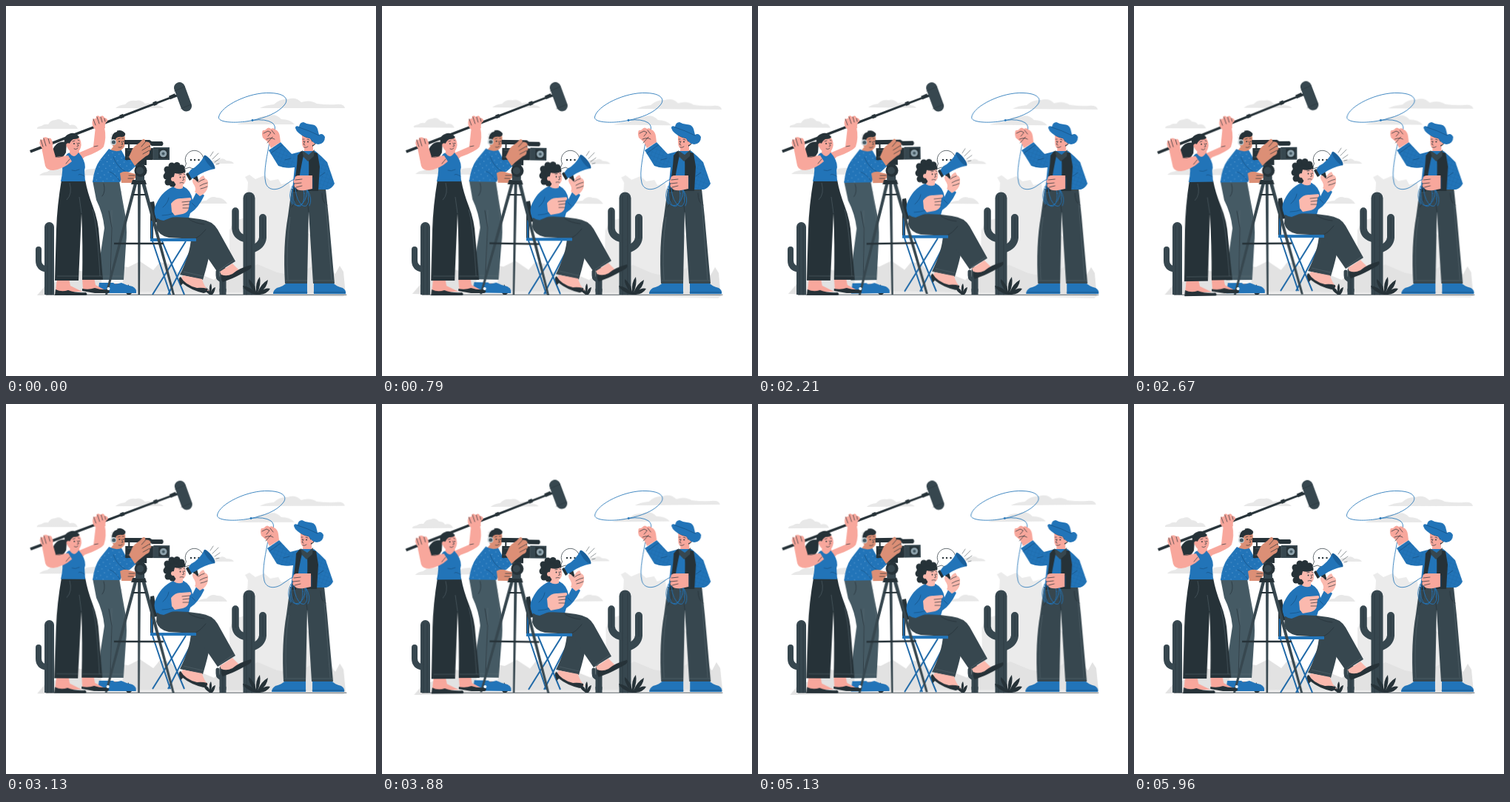
An HTML page that plays this animation: 500 px wide and 500 px high, repeating every 6 s.

```html
<!DOCTYPE html>
<html lang="en">
<head>
<meta charset="utf-8">
<title>Western film shoot</title>
<style>
html, body { margin: 0; width: 100%; height: 100%; overflow: hidden; background: #fff; }
svg { display: block; width: 100%; height: 100%; }
.blue { fill: #2274b8; }
.navy { fill: #195f9b; }
.ink { fill: #263238; }
.slate { fill: #37474f; }
.steel { fill: #455a64; }
.skin { fill: #f8a79c; }
#camera .skin { fill: #dc8f76; }
#director .skin { fill: #fbb9ae; }
.sky { fill: #e8e8e8; }
.hill { fill: #e2e2e2; }
.mesa { fill: #ebebeb; }
.line { fill: none; stroke: #263238; stroke-width: .7; stroke-linecap: round; stroke-linejoin: round; }
.hair-line { fill: none; stroke: #263238; stroke-width: .5; stroke-linecap: round; }
.seam { fill: none; stroke: #5d6d75; stroke-width: .5; }
.fold { fill: none; stroke: #174f80; stroke-width: .7; stroke-linecap: round; }
.rope { fill: none; stroke: #2274b8; stroke-width: .85; stroke-linecap: round; }
.frame { fill: none; stroke: #1f69a8; stroke-width: 2; }

/* Rotating groups pivot on their own centre */
.wind { animation: wind 6s linear infinite; }
#scenery { transform-origin: 250px 258px; }
#camera { transform-origin: 171px 280px; animation-duration: 3s; }
#boom { transform-origin: 142px 247px; animation-duration: 1.5s; }
#director { animation: float 6s ease-in-out infinite; }
#cowboy { animation: shake 6s linear infinite; }

@keyframes wind {
  25% { transform: rotate(1deg); }
  75% { transform: rotate(-1deg); }
}
@keyframes float {
  50% { transform: translateY(-5px); }
}
@keyframes shake {
  10%, 90% { transform: translateX(-1px); }
  20%, 80% { transform: translateX(2px); }
  30%, 50%, 70% { transform: translateX(-3.5px); }
  40%, 60% { transform: translateX(3.5px); }
}
</style>
</head>
<body>
<svg viewBox="0 0 500 500" xmlns="http://www.w3.org/2000/svg">
<defs>
  <pattern id="dots" width="9" height="9" patternUnits="userSpaceOnUse" patternTransform="rotate(12)">
    <g fill="#7fb3de"><circle cx="2" cy="2" r=".6"/><circle cx="6.5" cy="6.5" r=".6"/></g>
  </pattern>
  <pattern id="check" width="5" height="5" patternUnits="userSpaceOnUse" patternTransform="rotate(20)">
    <path d="M0 0H5M0 0V5" fill="none" stroke="#1d659f" stroke-width=".5"/>
  </pattern>
</defs>

<g id="scenery" class="wind">
  <g class="sky">
    <path d="M42 166Q41 163 48 162Q52 159 57 160Q60 154 67 154Q73 151 78 157Q84 157 86 161Q94 159 97 166Z"/>
    <path d="M148 138Q152 134 161 133Q166 127 175 128Q183 126 188 132Q196 130 200 134Q210 134 213 138Z"/>
    <path d="M45 229Q48 225 56 224Q62 219 70 220Q84 216 92 224L111 229Z"/>
    <path d="M343 138Q350 134 362 133Q370 125 381 126Q391 122 399 130Q411 126 420 132Q435 134 446 133Q457 132 458 138Z"/>
    <path d="M312 160Q322 156 335 155Q342 148 352 149Q364 144 372 153Q384 153 390 160Z"/>
    <path d="M272 213Q279 207 288 208Q293 204 298 209Q306 209 308 213Z"/>
    <path d="M258 267Q264 263 271 263Q277 256 285 259Q293 258 299 267Z"/>
    <path d="M96 229Q105 219 120 220L136 229Z"/>
  </g>
  <path class="mesa" d="M302 390V303L308 290L324 286L327 238L323 231L329 228L337 234L349 229L357 236L368 234L372 241L383 238L386 270L400 300L424 320L444 362V390Z"/>
  <path class="hill" d="M42 391L53 378L70 372L96 357L121 362L146 350L165 353L181 345L199 357L208 346L222 349L232 360L259 361L281 370L302 352L322 357L340 349L366 360L391 365L420 348L434 353L445 362L451 351L456 359L459 391Z"/>
  <path class="mesa" d="M44 390Q170 384 290 387Q400 386 458 390L456 393L330 391Z"/>
</g>

<path class="line" d="M54 390.300H460"/>

<g id="plants">
  <g fill="none" stroke="#37474f" stroke-linecap="round">
    <path stroke-width="13" d="M58.500 298.500V383"/>
    <path stroke-width="8" d="M44 329V344Q44 354 55 356"/>
    <path stroke-width="16" d="M328.500 259.500V381"/>
    <path stroke-width="9.500" d="M310 277V301Q311 312 325 315"/>
    <path stroke-width="10" d="M347 286V313Q346 324 332 329"/>
    <path stroke-width="9" d="M293 357V385"/>
    <path stroke-width="5" d="M286 359V364Q286 370 292 371"/>
  </g>
  <path class="slate" d="M52 380H65V390H52ZM320.500 378H336.500V390H320.500ZM288.500 382H297.500V390H288.500Z"/>
  <path class="hair-line" d="M56 296V390M61 296V390M325 256V390M332 256V390M310 276V302M347 286V314M293 357V389"/>
  <g class="ink">
    <path d="M337 390Q323 386 320 378Q331 380 336 387Q327 376 328 369Q336 375 338 386Q337 373 343 366Q345 376 340 387Q345 375 354 370Q353 381 343 387Q351 380 357 382Q353 389 343 390Z"/>
    <path d="M275 390Q267 385 267 379Q274 382 275 386Q274 378 277 375Q279 381 277 386Q279 381 283 380Q282 387 279 390Z"/>
    <path d="M164 390L156 381Q163 382 164 386L165 376Q169 382 166 387L173 381Q172 387 168 390Z"/>
  </g>
</g>

<g id="bubble">
  <path d="M248 218L240.500 220.500L243.500 213A12.300 12.300 0 1 1 248 218Z" fill="#fff" stroke="#263238" stroke-width=".7"/>
  <g class="ink"><circle cx="250" cy="208" r="1.200"/><circle cx="255" cy="208" r="1.200"/><circle cx="260.500" cy="208" r="1.200"/></g>
</g>

<g id="director">
  <path class="frame" d="M198 318L222 390M243 318L198 390M211 318L241 390M256 318L219 390"/>
  <path class="ink" d="M195 265L200 264L205 292L199 293L199 314H195Z"/>
  <path class="frame" d="M197 290V315"/>
  <path class="slate" d="M237 302H270Q279 313 276 330Q273 347 266 370L235 363Q249 335 250 314Z"/>
  <path class="skin" d="M239 364L265 369Q267 378 274 385Q252 383 235 371Z"/>
  <path class="ink" d="M236 366Q233 367 234 371L236 378L239 375Q250 384 267 388Q273 387 272 382Q265 380 258 381Q242 377 236 366Z"/>
  <path class="blue" d="M226 244L240 244Q250 249 252 262L259 248L268 256Q260 273 249 280L246 290L205 291Q199 281 201 272Q209 251 226 244Z"/>
  <path class="slate" d="M204 287Q235 283 262 288Q279 290 286 302L310 345L286 360L255 315L220 313Q206 310 203 299Z"/>
  <path class="seam" d="M288 357L308 343M240 359L266 365"/>
  <path class="line" d="M255 315Q263 311 270 302M247 288Q256 294 268 295"/>
  <path class="skin" d="M289 359L306 348L315 357L294 370Z"/>
  <path class="ink" d="M291 363Q298 366 306 362Q315 354 331 350Q333 353 329 356Q315 364 306 368L293 373Q290 370 291 363Z"/>
  <path class="blue" d="M195 314H257V318H195Z"/>
  <path class="skin" d="M228 237L239 240L239 246Q233 249 227 245Z"/>
  <g class="ink">
    <circle cx="226" cy="227" r="11.500"/><circle cx="218" cy="221" r="4.500"/><circle cx="224" cy="216" r="4.500"/>
    <circle cx="231" cy="215.500" r="4.500"/><circle cx="237" cy="219" r="4.500"/><circle cx="239" cy="223" r="3.500"/>
    <circle cx="217" cy="230" r="4.500"/><circle cx="219" cy="238" r="4.500"/><circle cx="225" cy="240" r="4.500"/>
  </g>
  <path class="skin" d="M228 226Q236 228 241 225Q244 230 243 236Q241 243 234 243Q227 241 226 234Z"/>
  <circle class="skin" cx="226" cy="234" r="3"/>
  <path class="line" d="M234 228L237 227.500M240 227L242 228M239 231L240.500 235L238.500 235.500M235 239Q238 238 240 239"/>
  <g class="ink"><circle cx="235.500" cy="231.500" r=".9"/><circle cx="241" cy="231" r=".8"/></g>
  <g id="megaphone">
    <path class="ink" d="M252 230L258 228L261 239L256 240Z"/>
    <path class="blue" d="M244 229L250 221Q262 215 268 202L282 220Q267 223 256 231L248 235Z"/>
    <ellipse class="navy" cx="275" cy="211" rx="3.200" ry="11.500" transform="rotate(-38 275 211)"/>
    <path class="ink" d="M243 227L246 225L251 234L248 236Z"/>
    <path class="hair-line" d="M276 203L280 197M279 207L287 199M282 211L289 206M284 214L288 213"/>
  </g>
  <path class="skin" d="M253 240Q250 233 255 234L259 238Q262 230 267 229L269 233Q274 235 273 241Q273 249 267 254L262 257L255 251Q258 247 253 240Z"/>
  <path class="line" d="M260 238Q264 235 268 234M262 243Q267 240 272 239M263 247Q268 246 272 244"/>
  <path class="blue" d="M213 255L223 266L218 272L228 280L228 284L213 290Q202 289 201 279Z"/>
  <path class="fold" d="M220 259Q219 266 212 272M246 261Q246 270 240 276M228 280Q218 283 211 283M251 266L256 271"/>
  <path class="skin" d="M223 267Q229 259 237 260L249 259Q252 261 248 264L247 273Q246 279 239 281L228 283L224 278Z"/>
  <path class="line" d="M238 265L248 264M239 269L248 268M239 273L247 273"/>
</g>

<g id="camera" class="wind">
  <path class="skin" d="M129 367H158V376H129Z"/>
  <path fill="#f5f5f5" d="M129 370H158V375H129Z"/>
  <path class="blue" d="M126 374H145L152 380V388H124ZM138 375Q148 377 156 374Q164 378 171 379Q177 382 176 388H138Z"/>
  <path class="steel" d="M117 236H153Q156 255 162 287Q164 306 162 323L159 370H124Q127 335 133 300Q131 280 122 262Z"/>
  <path class="seam" d="M143 276L142 365M125 365H159M155 250L160 290"/>
  <path class="line" d="M132 240Q135 251 130 257M141 370L143 300L139 277"/>
  <path class="skin" d="M145 190H156V199L148 201L141 195Z"/>
  <g id="shirt">
    <path class="blue" d="M139 193Q147 198 156 195L163 208L168 204L178 214L167 224L160 226L154 238H117Q119 219 127 208Z"/>
    <path fill="url(#dots)" d="M139 193Q147 198 156 195L163 208L168 204L178 214L167 224L160 226L154 238H117Q119 219 127 208Z"/>
  </g>
  <path class="fold" d="M145 204Q150 218 162 224M164 209L159 206M154 237Q147 226 140 224"/>
  <path class="skin" d="M154 226Q160 222 167 225L175 227Q178 230 174 233L170 239L156 239Z"/>
  <path class="line" d="M166 229H174M165 233H172"/>

  <path class="skin" d="M144 174Q153 176 160 174Q162 181 160 190Q157 196 150 195Q142 190 143 182Z"/>
  <path class="ink" d="M143 185Q139 173 147 170Q155 165 161 172Q162 176 157 177Q150 176 148 180L147 186Z"/>
  <path d="M142 183Q141 171 150 169" fill="none" stroke="#fff" stroke-width="1.300"/>
  <circle cx="145" cy="184" r="4" fill="#cfd8dc"/><circle class="steel" cx="145.500" cy="184" r="2.600"/>
  <path class="line" d="M151 180L154 179M157 179H159M156 183L158 187L156 187M152 191Q155 192 157 190"/>
  <g class="ink"><circle cx="153" cy="183" r=".9"/><circle cx="158.500" cy="183" r=".8"/></g>

  <g id="tripod">
    <path class="slate" d="M173 239H177.500L137 390H134ZM178 239H182L181 390H178.500ZM183 239H188L228 390H225Z"/>
    <path class="ink" d="M146 319.700H213V322.300H146ZM171 254H189V256H171Z"/>
    <path class="ink" d="M171 235H188L190 241H169ZM174 208H190V215H174Z"/>
    <path class="slate" d="M175 214H187V236H175Z"/>
    <circle class="ink" cx="182" cy="222.500" r="8.500"/><circle class="slate" cx="181" cy="222.500" r="5"/>
  </g>
  <path class="ink" d="M161 192H199L202 194V206L198 208H161ZM160 181H194L197 183H211Q214 186 211 189H197L194 187H160ZM165 185H167V193H165ZM193 187H195V193H193Z"/>
  <path class="slate" d="M199 191H221V208H199Z"/>
  <path class="ink" d="M206 193H219V206H206Z"/>
  <circle cx="212.500" cy="199.500" r="4.800" fill="#90a4ae"/><circle class="steel" cx="212.500" cy="199.500" r="2"/>
  <path class="seam" d="M164 195H194M199 192V207M163 204H175"/>
  <path class="skin" d="M166 204L171 193Q175 188 180 185L185 180Q188 179 188 183L193 184Q197 187 194 190Q198 192 194 196Q195 201 189 203L179 211L174 216Z"/>
  <path class="line" d="M183 190L189 183M184 195L194 189M185 200L194 195"/>
</g>

<g id="boom" class="wind">
  <path class="skin" d="M69 368H85L87 378L103 386H67ZM103 367H119L121 377L134 384H104Z"/>
  <path class="ink" d="M67 383Q75 387 84 384Q95 388 108 387Q111 390 108 391H66ZM103 382Q112 384 120 381Q129 384 138 383Q142 386 138 388H120L103 385Z"/>
  <circle cx="138.500" cy="382" r="2" fill="#fff"/>
  <path class="ink" d="M75 235H107Q110 252 117 270Q125 290 126 312L131 370H103Q104 320 102 280L98 371H66L68 302Q69 270 75 235Z"/>
  <path class="seam" d="M69 365H98M104 365H130M117 275Q123 295 127 365"/>
  <path class="seam" d="M86 239Q90 254 82 262M102 280L99 258"/>

  <path class="ink" d="M82 184Q73 182 68 187Q61 193 64 201Q63 206 69 208Q77 206 81 198Z"/>
  <path class="skin" d="M88 190L99 196L98 207L83 208Z"/>
  <path class="skin" d="M79 208L97 199L118 190L121 163L133 164Q136 178 132 190Q128 196 106 204L94 218Z"/>
  <path class="blue" d="M81 202Q85 196 87 200Q92 207 98 198L102 203Q109 214 106 222L107 237H74Q78 219 75 213Z"/>
  <path class="fold" d="M99 221Q93 224 89 222M106 230Q100 226 98 228"/>
  <path class="skin" d="M48 191L62 187L67 204L84 202L89 210Q78 220 64 222Q55 222 53 216Z"/>
  <path class="line" d="M67 204Q72 205 77 203M81 213L86 207M119 190L124 189"/>

  <path class="skin" d="M83 179Q91 181 98 177Q103 184 101 191Q99 199 92 198Q83 196 82 188Z"/>
  <path class="ink" d="M80 189Q76 176 85 173Q93 169 99 177Q98 180 91 180Q87 182 85 188Z"/>
  <circle class="skin" cx="84" cy="188" r="2.700"/>
  <path class="line" d="M90 183L93 182M97 181L99 182M96 185L98 189L96 189.500M92 193Q95 195 97 192"/>
  <g class="ink"><circle cx="92" cy="186" r=".9"/><circle cx="98.500" cy="185.500" r=".8"/></g>

  <path class="ink" d="M32 195L228 120.300L229 122.800L33.500 198.500Z"/>
  <path d="M154 150L159 148M199 132.600L204 130.700M221 124L229 120.500" fill="none" stroke="#263238" stroke-width="5"/>
  <path d="M228 122L234 120L241 126" fill="none" stroke="#263238" stroke-width="3"/>
  <path d="M234.500 110.500L243.500 135" fill="none" stroke="#37474f" stroke-width="15" stroke-linecap="round"/>
  <path class="hair-line" d="M227.500 115L241.500 109M236 139L250 133"/>

  <path class="skin" d="M47 190Q44 184 47 180Q51 182 50 178Q55 176 57 179Q61 177 62 182Q65 187 61 192L51 195Z"/>
  <path class="line" d="M47 181L50 190M51 179L54 189M57 179L59 186"/>
  <path class="skin" d="M118 164Q115 158 118 152Q122 154 122 149Q125 147 127 150Q131 146 133 151Q138 152 137 156Q133 158 134 165L123 169Z"/>
  <path class="line" d="M118 153L121 161M123 150L126 159M128 150L130 157M133 152L134 156"/>
</g>

<g id="cowboy">
  <path class="blue" d="M379 374H407V389H361Q361 384 366 381Q375 379 379 374ZM416 374H442Q446 379 455 381Q460 384 459 389H416Z"/>
  <path class="fold" d="M362 387H407M416 387H458"/>
  <path class="slate" d="M386 247H432L436 285L444 375H415L409 278L407 375H377Q374 323 381 284Z"/>
  <path class="line" d="M409 278L407 262M427 253Q427 266 434 269M391 253Q392 265 386 272"/>
  <path class="seam" d="M378 371H407M415 371H443M384 285Q378 325 381 370M432 266L440 370"/>

  <path class="skin" d="M404 188H415V201L409 207L402 201Z"/>
  <path class="blue" d="M355 195L371 184L386 200L401 196H418L426 203L434 211L444 240Q441 246 435 248H387L390 218Q377 220 368 216Z"/>
  <path fill="url(#check)" d="M355 195L371 184L386 200L391 198L390 218Q377 220 368 216ZM424 204L434 211L444 240Q441 246 435 248H414V229L423 228Z"/>
  <path class="ink" d="M399 196L403 198Q397 222 394 251H387Q393 225 394 202ZM415 197L421 199L424 217L422 250H408Q410 222 409 207Z"/>
  <path class="slate" d="M400 195L409 201L417 194L416 203L408 210L402 204Z"/>
  <path class="fold" d="M358 199L373 188M385 206L377 208M424 230L431 225M415 232V247"/>

  <path class="ink" d="M413 174H419L418 187L414 190Z"/>
  <path class="skin" d="M400 171L414 175L415 182Q419 182 417 187L414 188Q412 196 406 194Q400 192 400 184Z"/>
  <path class="ink" d="M399 171Q406 172 415 178L414 184L411 179Q404 178 399 174Z"/>
  <path class="line" d="M401 180H403M407 180L410 181M404 183L402 187L404 188M403 191Q406 192 408 190"/>
  <g class="ink"><circle cx="402.500" cy="183" r=".8"/><circle cx="408" cy="183.500" r=".9"/></g>
  <path class="blue" d="M391 165Q391 161 396 163Q397 157 402 157Q407 160 412 160Q419 160 421 166L423 174Q428 171 431 177Q431 186 422 187Q415 186 411 179Q402 177 396 172Q392 169 391 165Z"/>
  <path class="fold" d="M396 164Q409 168 423 175"/>

  <path class="rope" d="M333 154.500C313 159 286 158 287.500 150C290 135 329 116 357 117.500C377 118 383 126 376 134C367 145 350 151 333 154.500Q351 152 360 158Q365 162 363 169"/>
  <circle cx="333" cy="154.500" r="1.400" class="blue"/>
  <path class="rope" d="M356 184C354 198 347 224 351 239C354 250 367 250 377 242Q386 235 394 232"/>
  <g class="rope">
    <ellipse cx="395" cy="254" rx="8" ry="17" transform="rotate(-4 395 254)"/>
    <ellipse cx="396" cy="255" rx="10" ry="15" transform="rotate(12 396 255)"/>
    <ellipse cx="400" cy="253" rx="8" ry="18" transform="rotate(-14 400 253)"/>
    <path d="M387 243Q380 257 387 268M407 248Q415 261 410 270"/>
  </g>
  <path class="skin" d="M347 178Q345 172 347 168Q351 168 352 166Q355 163 358 166Q362 164 364 167Q369 169 370 176L371 184L358 192L354 184Z"/>
  <path class="line" d="M348 172L354 169L358 171L354 176M352 180Q359 177 363 180M359 168L363 173M353 185L360 177"/>
  <path class="skin" d="M414 229V247L404 249Q394 250 392 246Q388 244 390 240Q387 237 390 234Q390 229 396 229Z"/>
  <path class="line" d="M391 235L400 234M390 240L399 239M392 245L400 243"/>
</g>
</svg>
</body>
</html>
```
